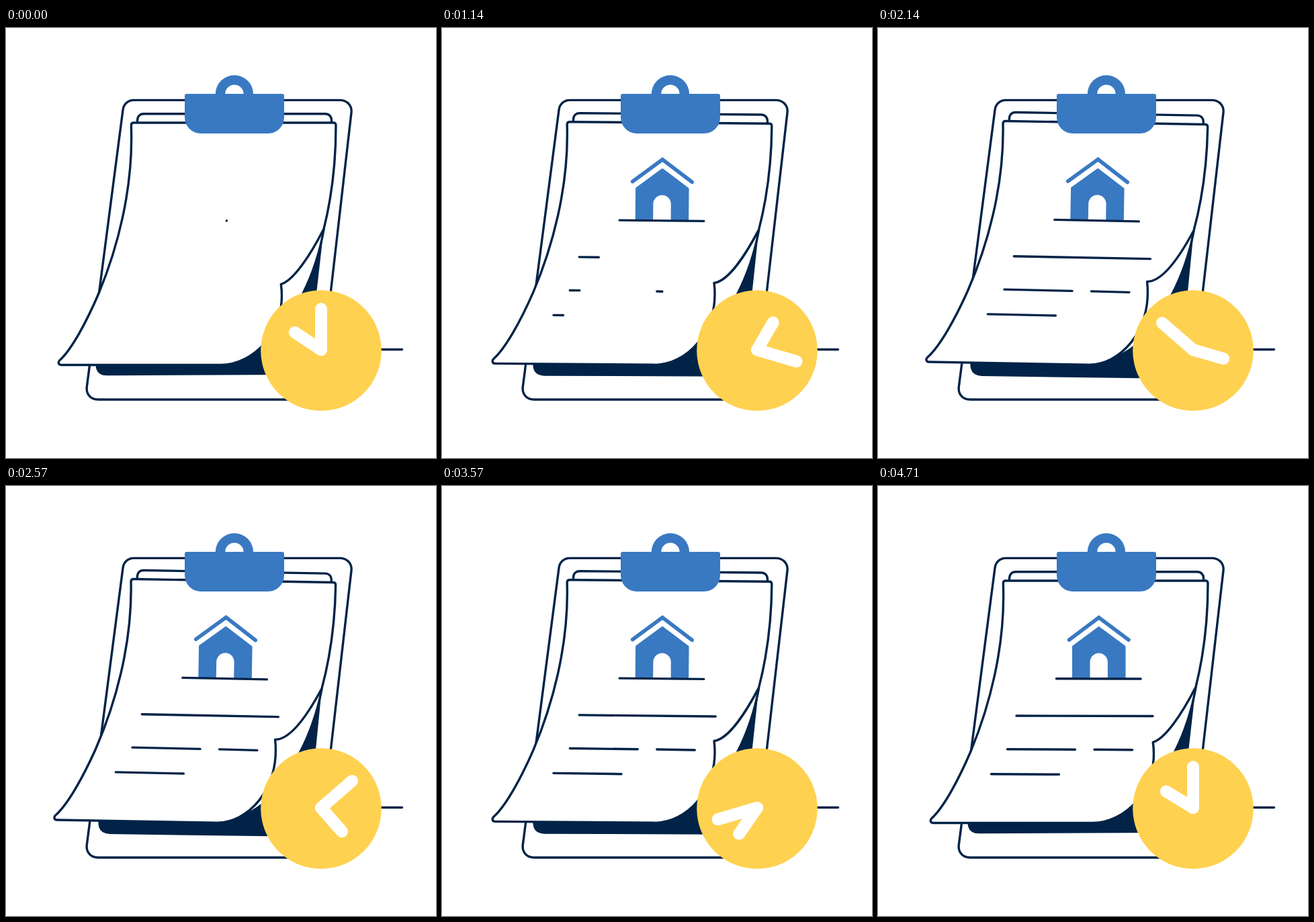
These frames come from a looping animation (640x640 px, 4.78 s). An HTML page:

```html
<!DOCTYPE html>
<html lang="en">
<head>
<meta charset="utf-8">
<title>Clipboard and clock</title>
<style>
  html, body { margin: 0; width: 100%; height: 100%; overflow: hidden; background: #fff; }
  svg { display: block; width: 100%; height: 100%; }
  .line { fill: none; stroke: #002347; stroke-width: 3.4; stroke-linecap: round; stroke-linejoin: round; }
  .sheet { fill: #fff; }
  .navy { fill: #002347; }
  .blue { fill: #3979c2; }
  .roof { fill: none; stroke: #3979c2; stroke-width: 5.6; stroke-linecap: round; stroke-linejoin: miter; }
  .house { stroke: #3979c2; stroke-width: 3; stroke-linejoin: round; }
  .hand { stroke: #fff; stroke-width: 18; stroke-linecap: round; }
</style>
</head>
<body>
<svg viewBox="0 0 640 640">
  <path class="line" d="M190 107.4H497C508 107.4 515.3 116 514 126L467 535C466 546 458 553 447 553H137C126 553 119 545 120.3 534L174 122C175 113 182 107.4 190 107.4Z"/>
  <path class="line" d="M469 478.5H589.5"/>

  <g class="tilt">
    <path class="line sheet" d="M195.5 141V138C195.5 132 199 127.8 205 127.8H475C481 127.8 484.5 132 484.5 137V141"/>
  </g>
  <path id="shade" class="navy"/>
  <g class="tilt">
    <path id="flap" class="line sheet"/>
    <path id="page" class="line sheet"/>

    <g id="house">
      <path class="blue house" d="M290.5 239L328.7 210.6L367 239V284.5H290.5Z"/>
    </g>
    <path id="door" fill="#fff" d="M315.5 287V262a13.2 13.2 0 0 1 26.4 0V287Z"/>
    <path id="roof" class="roof" d="M284.5 229L328.7 195.8L373 229"/>
    <path id="base" class="line"/>

    <g id="rows"></g>
  </g>

  <path class="blue" d="M269 98H411Q414 98 414 101V133A24 24 0 0 1 390 157H290A24 24 0 0 1 266 133V101Q266 98 269 98Z"/>
  <path class="blue" fill-rule="evenodd" d="M311.7 98.5a28.2 28.2 0 0 1 56.4 0ZM326.2 98.2a13.7 13.7 0 0 1 27.4 0Z"/>

  <circle cx="469" cy="480" r="89.8" fill="#ffd150"/>
  <path id="hour" class="hand" d="M469 479V432"/>
  <path id="minute" class="hand" d="M469 479V418"/>
</svg>
<script>
const LOOP = 4780, FPS = 14, SPAN = 66 / FPS * 1000;
const $ = id => document.getElementById(id);
const tilted = document.querySelectorAll('.tilt');

// x, y, length of each written row
const rows = [[206, 342, 203], [192.5, 391.7, 101], [322, 392.2, 56.5], [168.5, 428.8, 101]].map(([x, y, len]) => {
  const el = document.createElementNS('http://www.w3.org/2000/svg', 'path');
  el.setAttribute('class', 'line');
  $('rows').append(el);
  return { el, x, y, len };
});

const set = (el, name, value) => el.setAttribute(name, value);
const ease = s => { s = Math.min(1, Math.max(0, s)); return s * s * (3 - 2 * s); };
const step = (t, from, dur) => ease((t - from) / dur);

function scaleAt(el, x, y, sx, sy) {
  set(el, 'visibility', sx > 0 ? 'visible' : 'hidden');
  set(el, 'transform', `translate(${x} ${y}) scale(${sx} ${sy}) translate(${-x} ${-y})`);
}

// k runs from 0 (flat) to 1 (corner fully curled)
function drawPaper(k) {
  tilted.forEach(g => set(g, 'transform', `rotate(${k} 339.5 127)`));
  const tip = `${409.3 - 4.6 * k} ${381.3 - 5 * k}`;
  set($('page'), 'd',
    `M190 141H487.5Q491 141 491 145C491 200 484 255 473 299C453 338 428 376 ${tip}` +
    `C${419 - 5 * k} ${455 - 4 * k} 365 501.5 320 501.5H82` +
    'C78 501.5 77 497 80 494.5C98 478 120 437 138 395C165 330 190 240 186.3 145Q186.3 141 190 141Z');
  set($('flap'), 'd',
    `M473 300C465 345 452 375 442 395C428 432 ${408 - 12 * k} ${455 + 24 * k} ${381 - 31 * k} ${474 + 20 * k}L${tip}Z`);
  set($('shade'), 'd',
    `M${473 - 3 * k} ${299 + 2.3 * k}L${462.5 - 1.5 * k} ${391 + k}L450 480Q446 516 430 ${516 + 6 * k}` +
    `L${150 + 4 * k} ${517.3 + 0.7 * k}Q${134 + 4 * k} 517 ${133.5 + 4 * k} 502V495L300 480Z`);
}

function drawContent(t) {
  const half = 62.8 * step(t, 0, 750);
  set($('base'), 'd', `M${328.3 - half} 286.7L${328.3 + half} 287`);
  const h = step(t, 55, 750), r = step(t, 165, 750);
  scaleAt($('house'), 328.7, 286, h, h);
  scaleAt($('roof'), 328.7, 194, r, r);
  scaleAt($('door'), 328.7, 287, step(t, 400, 700), 1);
  const w = step(t, 940, 850);
  for (const { el, x, y, len } of rows) {
    set(el, 'visibility', w > 0 ? 'visible' : 'hidden');
    set(el, 'd', `M${x} ${y}l${len * w} ${0.5 * w}`);
  }
}

function draw(t) {
  drawPaper(ease(1 - Math.abs(2 * t / SPAN - 1)));
  drawContent(t);
  set($('hour'), 'transform', `rotate(${303.5 + 0.0759 * t} 469 479)`);
  set($('minute'), 'transform', `rotate(${720 * ease(t / SPAN)} 469 479)`);
}

const start = performance.now();
function tick() {
  const t = (performance.now() - start) % LOOP;
  // held at 14 pictures per second, starts rounded down to 10 ms
  draw(Math.min(66, Math.floor((t + 9) * FPS / 1000)) * 1000 / FPS);
  requestAnimationFrame(tick);
}
tick();
</script>
</body>
</html>
```
